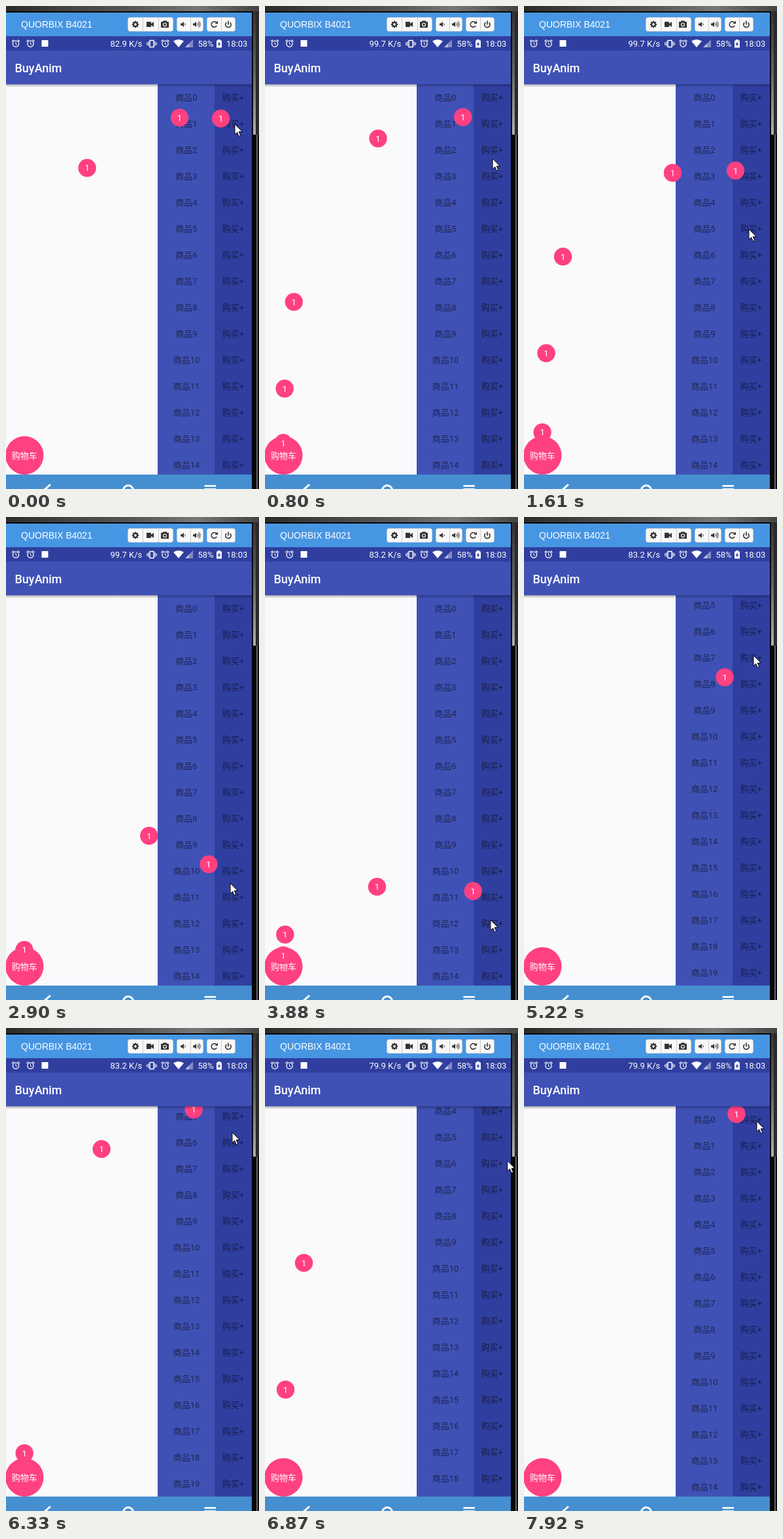
Write an HTML page with a canvas that moves like this. It is 387 by 736 pixels and loops after 8000 ms.

```html
<!DOCTYPE html>
<html lang="zh">
<head>
<meta charset="utf-8">
<title>BuyAnim</title>
<style>
html, body { margin: 0; width: 100%; height: 100%; overflow: hidden; background: #000; }
canvas { display: block; width: 387px; height: 736px; }
</style>
</head>
<body>
<canvas id="stage" width="387" height="736"></canvas>
<script>
const ctx = document.getElementById('stage').getContext('2d');
const LOOP = 8000, STEP = 137, FLIGHT = 1460, LINGER = 30;
const PINK = '#ff4081', INDIGO = '#3f51b5', NAVY = '#303f9f', INK = '#333', WHITE = '#fff';
const SANS = 'Roboto, "Noto Sans CJK SC", "Noto Sans CJK", sans-serif';
const CART = { x: 28.3, y: 684.7, r: 29.2 };
const SPEEDS = ['82.9', '99.7', '83.2', '79.9'];

// Runs of quickening taps: first tap, taps, row centre, rows moved per tap
const TAPS = [
  [-585, 3, 179], [338, 3, 179], [1242, 2, 259], [2362, 2, 499, 1], [3153, 1, 579],
  [3646, 1, 579], [5012, 1, 254], [5778, 2, 134], [7847, 1, 139]
];
const balls = TAPS.flatMap(([start, count, y, move = 0]) =>
  Array.from({ length: count }, (_, i) => ({
    start: start + 285 * i - 30 * i * (i - 1),
    rowY: y + 40 * move * i
  })));

// Pointer stops: time, x, y
const STOPS = [
  [300, 350, 180], [1644, 344, 340], [2877, 343, 558], [3836, 345, 614], [4050, 345, 622],
  [4470, 349, 417], [5206, 351, 211], [5800, 347, 138], [6302, 346, 159], [6720, 370, 170],
  [7220, 375, 375], [7946, 356, 142]
];

const clamp = v => Math.max(0, Math.min(1, v));
const ease = v => 0.5 - Math.cos(Math.PI * clamp(v)) / 2;
const mix = (a, b, k) => a + (b - a) * k;

// The picture refreshes about seven times a second.
const heldTime = t => Math.floor((t + 45) / STEP) * STEP;

// Drag to the end of the list, later back to its start.
const scrollAt = t => 205 * (ease((t - 4050) / 420) - ease((t - 6720) / 500));

function pointerAt(t) {
  const next = Math.max(1, STOPS.findIndex(s => s[0] >= t));
  const [t0, x0, y0] = STOPS[next - 1], [t1, x1, y1] = STOPS[next];
  const k = ease((t - t0) / (t1 - t0));
  return [mix(x0, x1, k), mix(y0, y1, k)];
}

// Quadratic curve from a buy button to the cart, walked by distance.
function flightPoint(rowY, part) {
  const y0 = rowY - 7, N = 120, path = [];
  for (let i = 0, len = 0; i <= N; i++) {
    const u = i / N, v = 1 - u;
    const x = 28 + 305 * v * v;
    const y = v * v * y0 + 2 * u * v * (y0 - 42) + u * u * 668;
    if (i) len += Math.hypot(x - path[i - 1].x, y - path[i - 1].y);
    path.push({ x, y, len });
  }
  const goal = path[N].len * part;
  const i = Math.max(1, path.findIndex(p => p.len >= goal));
  const a = path[i - 1], b = path[i], k = (goal - a.len) / (b.len - a.len);
  return [mix(a.x, b.x, k), mix(a.y, b.y, k)];
}

function rect(x, y, w, h, fill) {
  ctx.fillStyle = fill;
  ctx.fillRect(x, y, w, h);
}

function disc(x, y, r, fill) {
  ctx.fillStyle = fill;
  ctx.beginPath();
  ctx.arc(x, y, r, 0, 7);
  ctx.fill();
}

function ring(x, y, r, color, width, from = 0, to = 2 * Math.PI) {
  ctx.strokeStyle = color;
  ctx.lineWidth = width;
  ctx.beginPath();
  ctx.arc(x, y, r, from, to);
  ctx.stroke();
}

function trace(points) {
  ctx.beginPath();
  for (let i = 0; i < points.length; i += 2) ctx.lineTo(points[i], points[i + 1]);
}

function poly(points, fill) {
  trace(points);
  ctx.closePath();
  ctx.fillStyle = fill;
  ctx.fill();
}

function line(points, color, width) {
  trace(points);
  ctx.strokeStyle = color;
  ctx.lineWidth = width;
  ctx.stroke();
}

function text(str, x, y, color = WHITE, font = '13px ' + SANS, align = 'left') {
  ctx.font = font;
  ctx.textAlign = align;
  ctx.fillStyle = color;
  ctx.fillText(str, x, y);
}

const label = (str, x, y, color) => text(str, x, y, color, undefined, 'center');

function gradient(x1, y0, y1, ...colors) {
  const g = ctx.createLinearGradient(0, y0, x1, y1);
  colors.forEach((c, i) => g.addColorStop(i / (colors.length - 1), c));
  return g;
}

function drawBackdrop() {
  rect(0, 0, 387, 736, '#080808');
  rect(0, 0, 387, 8, gradient(387, 0, 0, '#2c2b2a', '#444', '#555', '#777', '#444'));
  rect(378, 8, 4, 188, gradient(0, 8, 196, '#333', '#666', '#b0b0b0'));
  rect(382, 8, 5, 188, '#2a2a2a');
  rect(383, 196, 2, 540, '#666');
}

function buttonGroup(x, w, count) {
  ctx.beginPath();
  ctx.roundRect(x + 0.5, 17.5, w - 1, 21, 3);
  ctx.fillStyle = '#f8f8f8';
  ctx.fill();
  ctx.strokeStyle = '#c4ccd4';
  ctx.lineWidth = 1;
  ctx.stroke();
  for (let i = 1; i < count; i++) rect(Math.round(x + w * i / count), 18, 1, 20, '#ccc');
}

function drawTitleBar() {
  rect(0, 10, 376, 36, '#4796e3');
  text('QUORBIX B4021', 23, 33, WHITE, '14px "Liberation Sans", Arial, sans-serif');
  buttonGroup(186, 70, 3);
  buttonGroup(261, 41, 2);
  buttonGroup(307, 44, 2);

  for (let a = 0; a < 6; a += Math.PI / 4) {
    const c = Math.cos(a), s = Math.sin(a);
    line([198 + 2 * c, 28 + 2 * s, 198 + 5.2 * c, 28 + 5.2 * s], INK, 2);
  }
  ring(198, 28, 2.9, INK, 2);

  rect(215, 24, 7, 8, INK);
  poly([222, 27, 226, 24, 226, 32, 222, 29], INK);

  rect(237, 24, 12, 9, INK);
  rect(240, 22.5, 6, 2, INK);
  disc(243, 28.4, 3, '#f8f8f8');
  disc(243, 28.4, 1.8, INK);

  [267, 286].forEach((x, loud) => {
    poly([x, 26.5, x + 2, 26.5, x + 5, 24, x + 5, 32, x + 2, 29.5, x, 29.5], INK);
    for (let i = 0; i <= 2 * loud; i++) ring(x + 5, 28, 2.2 + 2 * i, INK, 1, -0.9, 0.9);
  });

  ring(318.5, 28, 4.2, INK, 1.6, 0.5, 5.5);
  poly([319.5, 27, 324, 27, 324, 22.5], INK);
  ring(340, 28.4, 4.2, INK, 1.6, -0.9, Math.PI + 0.9);
  rect(339.2, 22.5, 1.6, 6, INK);
}

function alarm(x) {
  ring(x, 57.5, 4.6, WHITE, 1.3);
  line([x, 54.8, x, 58, x + 2, 59.2], WHITE, 1);
  for (const side of [-1, 1]) line([x + 6 * side, 54, x + 3 * side, 51.5], WHITE, 1.3);
}

function drawStatusBar(t) {
  rect(0, 46, 376, 22, NAVY);
  [15, 37.5, 243.5].forEach(alarm);
  rect(54.5, 52, 10, 10, WHITE);

  // The network speed is measured every three seconds.
  text(SPEEDS[Math.floor((t + 2300) / 3000)] + ' K/s', 159.5, 62);

  line([220, 52.5, 226, 52.5, 226, 62.5, 220, 62.5, 220, 52], WHITE, 1.4);
  for (const side of [-1, 1]) {
    line([223 + side * 5, 54, 223 + side * 5, 61], WHITE, 1.2);
    line([223 + side * 7.2, 55.5, 223 + side * 7.2, 59.5], WHITE, 1.2);
  }

  ctx.fillStyle = WHITE;
  ctx.beginPath();
  ctx.moveTo(264, 63);
  ctx.lineTo(256, 53.5);
  ctx.quadraticCurveTo(264, 48.5, 272, 53.5);
  ctx.fill();
  poly([274, 63, 286, 63, 286, 51], 'rgba(255,255,255,.4)');
  poly([274, 63, 280, 63, 280, 57], 'rgba(255,255,255,.45)');

  text('58%', 293.5, 62);
  rect(322, 52.5, 8, 11, WHITE);
  rect(324.2, 51, 3.6, 2, WHITE);
  poly([326.8, 54, 323.6, 58.7, 325.6, 58.7, 325.2, 62, 328.4, 57.3, 326.4, 57.3], NAVY);
  text('18:03', 337, 62);
}

function drawList(t) {
  rect(0, 119, 232, 595, '#faf9fb');
  rect(232, 119, 87, 595, INDIGO);
  rect(319, 119, 57, 595, NAVY);
  const top = 144 - scrollAt(t);
  for (let i = 0; i < 20; i++) {
    label('商品' + i, 276, top + 40 * i, 'rgba(0,0,0,.54)');
    label('购买+', 347.5, top + 40 * i, 'rgba(0,0,0,.54)');
  }
}

function drawCart(t) {
  disc(CART.x, CART.y, CART.r, PINK);
  label('购物车', CART.x, CART.y + 4.8);
  for (const { start, rowY } of balls) {
    const age = t - start;
    if (age < 0 || age > FLIGHT + LINGER) continue;
    const [x, y] = flightPoint(rowY, ease(age / FLIGHT));
    disc(x, y, 13.7, PINK);
    label('1', x, y + 4.7);
  }
}

function drawApp(t) {
  ctx.save();
  ctx.beginPath();
  ctx.rect(0, 119, 376, 595);
  ctx.clip();
  drawList(t);
  drawCart(t);
  rect(0, 119, 376, 5, gradient(0, 119, 124, 'rgba(0,0,0,.3)', 'rgba(0,0,0,0)'));
  ctx.restore();
  rect(0, 68, 376, 51.3, INDIGO);
  text('BuyAnim', 13.5, 101, WHITE, '500 18px ' + SANS);
}

function drawNavBar() {
  rect(0, 714, 376, 22, '#458fd0');
  line([68, 729, 59, 737, 68, 745], WHITE, 3);
  ring(187, 738, 7.5, WHITE, 3);
  for (const y of [730, 735]) rect(303.5, y, 17.5, 2.6, WHITE);
}

function drawPointer(t) {
  ctx.save();
  ctx.translate(...pointerAt(t));
  poly([0, 0, 0, 16, 3.7, 12.5, 6.3, 18.5, 8.8, 17.4, 6.3, 11.6, 11.3, 11.3], WHITE);
  ctx.strokeStyle = '#000';
  ctx.lineWidth = 1;
  ctx.stroke();
  ctx.restore();
}

function drawFrame(t) {
  drawBackdrop();
  drawTitleBar();
  drawStatusBar(t);
  drawApp(t);
  drawNavBar();
  drawPointer(t);
}

const origin = performance.now();
function tick() {
  drawFrame(heldTime((performance.now() - origin) % LOOP));
  requestAnimationFrame(tick);
}
tick();
</script>
</body>
</html>
```
